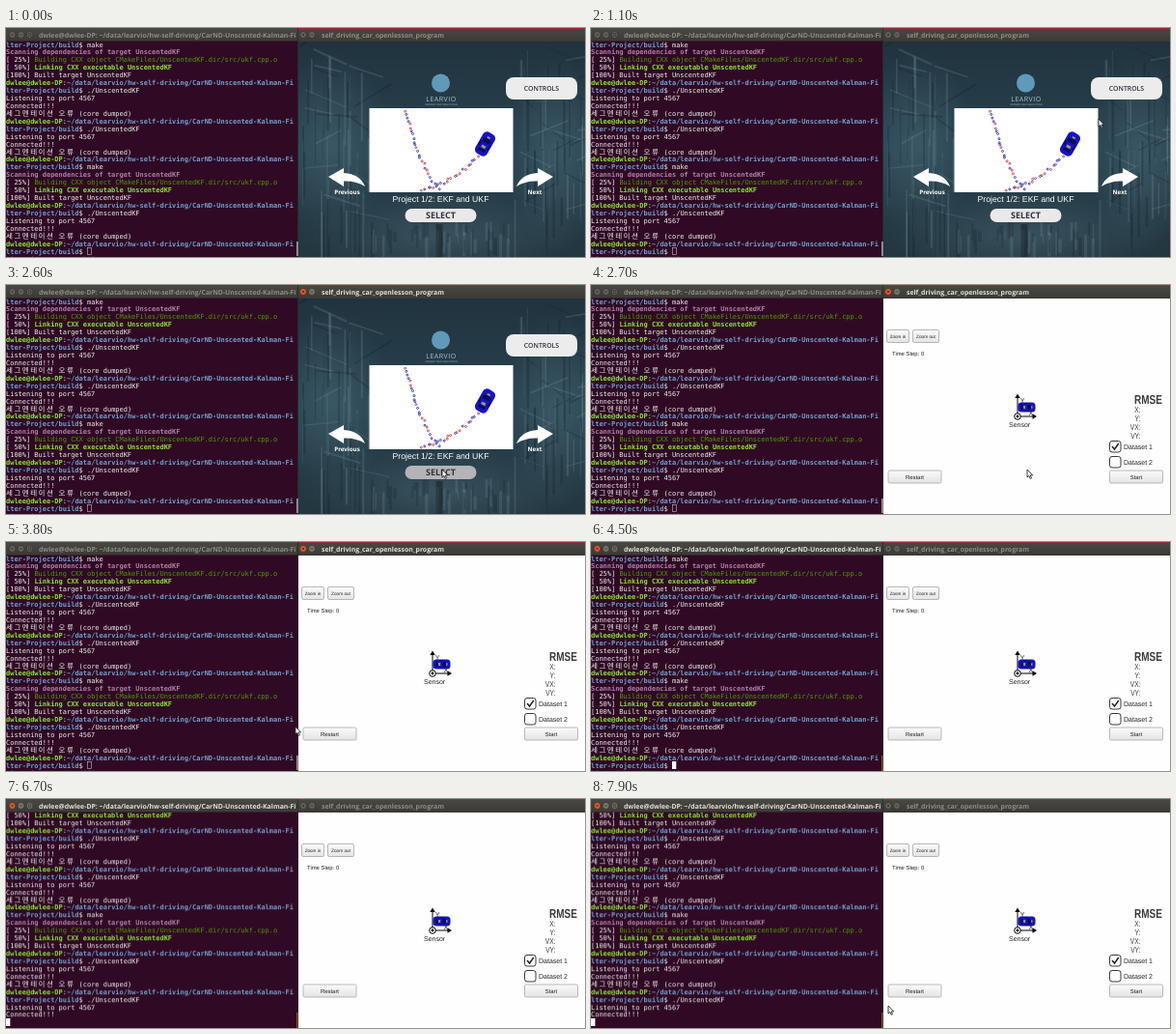
These frames come from a looping animation (600 by 237 pixels, 8000 ms). An HTML page:

```html
<!DOCTYPE html>
<html lang="en">
<head>
<meta charset="utf-8">
<title>Terminal and simulator</title>
<style>
html, body { margin: 0; width: 100%; height: 100%; overflow: hidden; background: #2b2a27; }
svg { display: block; width: 100%; height: 100%; }
text { white-space: pre; text-rendering: geometricPrecision; }
.term { font: 6.977px "DejaVu Sans Mono", monospace; fill: #eeeeec; }
.user { fill: #8ae234; font-weight: bold; }
.path { fill: #729fcf; font-weight: bold; }
.scan { fill: #ad7fa8; font-weight: bold; }
.build { fill: #4e9a06; }
.link { fill: #8ae234; font-weight: bold; }
.ko { font: 7.5px "Noto Sans CJK KR", "Noto Sans CJK", sans-serif; letter-spacing: 1.5px; }
.title { font: 700 6.9px "Open Sans", sans-serif; }
.menu { font-family: "Open Sans", sans-serif; text-anchor: middle; }
.sim { font-family: "Liberation Sans", Arial, sans-serif; fill: #222; }
.mid { text-anchor: middle; }
.end { text-anchor: end; }

/* one shared 8 s clock */
.hold { animation: 8s step-end infinite; }
.left-on { animation-name: leftOn; }
.left-off { animation-name: leftOff; }
.right-on { animation-name: rightOn; }
.right-off { animation-name: rightOff; }
.simscene { animation-name: simScene; }
.select { animation-name: press; }
.scroll { animation-name: scroll; }
.caret { animation-name: type; }
.block { animation-name: blink; }
.pointer { animation: move 8s linear infinite; }
.show { animation-name: show; }

@keyframes leftOn { 0% { opacity: 0 } 51.25%, 100% { opacity: 1 } }
@keyframes leftOff { 0% { opacity: 1 } 51.25%, 100% { opacity: 0 } }
@keyframes rightOn { 0% { opacity: 0 } 30% { opacity: 1 } 51.25%, 100% { opacity: 0 } }
@keyframes rightOff { 0% { opacity: 1 } 30% { opacity: 0 } 51.25%, 100% { opacity: 1 } }
@keyframes simScene { 0% { opacity: 0 } 33.75%, 100% { opacity: 1 } }
@keyframes press { 0% { fill: #e9e9ea } 31.25% { fill: #b4b4b6 } 33.75%, 100% { fill: #e9e9ea } }
@keyframes scroll { 0% { transform: none } 83.75%, 100% { transform: translateY(-23.79px) } }
@keyframes type {
  0% { transform: translate(84px, 0) }
  60% { transform: translate(88.2px, 0) }
  61.25% { transform: translate(92.4px, 0) }
  65% { transform: translate(96.6px, 0) }
  66.25% { transform: translate(100.8px, 0) }
  67.5% { transform: translate(105px, 0) }
  70% { transform: translate(109.2px, 0) }
  71.25% { transform: translate(113.4px, 0) }
  72.5% { transform: translate(142.8px, 0) }
  83.75%, 100% { transform: translate(0, 23.79px) }
}
@keyframes blink {
  0% { opacity: 0 } 51.25% { opacity: 1 } 80% { opacity: 0 }
  83.75% { opacity: 1 } 91.25% { opacity: 0 } 98.75%, 100% { opacity: 1 }
}
@keyframes show { 0% { opacity: 0 } 5% { opacity: 1 } 55% { opacity: 0 } 98.75%, 100% { opacity: 1 } }
@keyframes move {
  0%, 5% { transform: translate(597px, 62px) }
  11.25%, 13.75% { transform: translate(526px, 94px) }
  23.75% { transform: translate(457px, 188px) }
  26.25%, 38.75% { transform: translate(452px, 191px) }
  47.5% { transform: translate(300px, 191px) }
  48.75% { transform: translate(287px, 192px) }
  53.75%, 98.7% { transform: translate(265px, 195px) }
  98.75%, 100% { transform: translate(308px, 214px) }
}
</style>
</head>
<body>
<svg viewBox="0 0 600 237" preserveAspectRatio="none">
  <defs>
    <linearGradient id="night" x1="0" y1="0" x2="0" y2="1">
      <stop offset="0" stop-color="#20333e"/>
      <stop offset=".5" stop-color="#284350"/>
      <stop offset="1" stop-color="#22363f"/>
    </linearGradient>
    <radialGradient id="glow">
      <stop offset="0" stop-color="#4d6b79" stop-opacity=".5"/>
      <stop offset="1" stop-color="#4d6b79" stop-opacity="0"/>
    </radialGradient>
    <linearGradient id="btn" x1="0" y1="0" x2="0" y2="1">
      <stop offset="0" stop-color="#fafafa"/>
      <stop offset="1" stop-color="#e4e4e4"/>
    </linearGradient>
    <linearGradient id="bar" x1="0" y1="0" x2="0" y2="1">
      <stop offset="0" stop-color="#4a4843"/>
      <stop offset="1" stop-color="#3b3a36"/>
    </linearGradient>
    <clipPath id="termBox"><rect y="13" width="303" height="224"/></clipPath>
    <clipPath id="titleBox"><rect width="300" height="14"/></clipPath>
    <clipPath id="sceneBox"><rect x="303" y="14" width="297" height="223"/></clipPath>
    <g id="car">
      <rect x="-9" y="-5" width="18" height="10" rx="3.500" fill="#1414c6"/>
      <path d="M3-3.6Q6 0 3 3.6L1 2.6V-2.6Z M-6-3L-4-2.4V2.4L-6 3Z" fill="#0b0b52"/>
      <path d="M-3-3.7H1M-3 3.7H1" stroke="#0b0b52"/>
      <path d="M-3.4-1.6H-1.4V1.6H-3.4Z M4.6-1.2H6V1.2H4.6Z" fill="#a79b52"/>
    </g>
    <path id="next" d="M567 154L551 145V150Q534 151 529 164Q538 158 551 158.500V164Z" fill="#fff"/>
  </defs>

  <!-- terminal -->
  <rect width="302" height="237" fill="#300a24"/>
  <g clip-path="url(#termBox)">
    <g class="scroll hold">
      <g id="rows" class="term"></g>
      <g class="caret hold">
        <rect y="226.500" width="75" height="8.500" fill="#300a24"/>
        <rect class="left-off hold" x=".5" y="227.500" width="4" height="7" fill="none" stroke="#c4bcc2" stroke-width=".6"/>
        <rect class="block hold" y="227" width="4.300" height="8" fill="#fff"/>
      </g>
    </g>
  </g>
  <rect width="302" height="13.500" fill="url(#bar)"/>
  <g id="leftBar" clip-path="url(#titleBox)"></g>

  <!-- simulator menu -->
  <g clip-path="url(#sceneBox)">
    <rect x="303" y="14" width="297" height="223" fill="url(#night)"/>
    <ellipse cx="338" cy="120" rx="60" ry="95" fill="url(#glow)"/>
    <ellipse cx="570" cy="130" rx="55" ry="100" fill="url(#glow)"/>
    <ellipse cx="450" cy="215" rx="140" ry="45" fill="url(#glow)"/>
    <g id="city" fill="none"></g>
  </g>
  <circle cx="450.500" cy="57" r="9.500" fill="#5f9ab8"/>
  <g class="menu" fill="#a9c6d4">
    <text x="451" y="75.500" font-size="7" letter-spacing=".5">LEARVIO</text>
    <text x="451" y="80" font-size="2.400">ADVANCE YOUR SKILLS TODAY</text>
  </g>
  <rect x="518" y="51" width="74" height="23" rx="8" fill="#ececed"/>
  <text class="menu" x="555" y="65" font-size="6.900" font-weight="600" fill="#2b2f35">CONTROLS</text>
  <rect x="376.500" y="83" width="149" height="87" fill="#fff"/>
  <g id="dots" fill="none" stroke-width=".9"></g>
  <use href="#car" transform="translate(496.500 120) rotate(-60) scale(1.4)"/>
  <use href="#next"/>
  <use href="#next" transform="translate(901 0) scale(-1 1)"/>
  <g class="menu" fill="#fff" font-size="6.200" font-weight="700">
    <text x="353.500" y="171.500">Previous</text>
    <text x="548" y="171.500">Next</text>
  </g>
  <text class="sim mid" x="450.500" y="180.300" font-size="8.700" style="fill:#fff">Project 1/2: EKF and UKF</text>
  <rect class="select hold" x="413.500" y="187" width="74" height="14" rx="7"/>
  <text class="menu" x="450.500" y="197.300" font-size="9" font-weight="700" fill="#30343a">SELECT</text>

  <!-- simulator run -->
  <g class="simscene hold sim">
    <rect x="303" y="14" width="297" height="223" fill="#fefefe"/>
    <g id="buttons"></g>
    <text x="312" y="73" font-size="5.900">Time Step: 0</text>
    <use href="#car" transform="translate(451.500 126.500)"/>
    <g stroke="#000" fill="none">
      <path d="M442 133V115M445 136H459"/>
      <circle cx="442" cy="136" r="3.300" fill="#fff"/>
    </g>
    <path d="M442 112.500L439.300 117H444.700Z M462 136L457.500 133.300V138.700Z" fill="#000"/>
    <circle cx="442" cy="136" r="1.400" fill="#000"/>
    <text x="444.800" y="121.500" font-size="7">Y</text>
    <text x="453.500" y="134.800" font-size="7">X</text>
    <text x="433" y="146.700" font-size="7">Sensor</text>
    <g style="fill:#3a3a3a">
      <text transform="translate(563 122.800) scale(.77 1)" font-size="13" font-weight="bold">RMSE</text>
      <g id="errors" font-size="8.600" class="end"></g>
    </g>
    <g fill="#fff" stroke="#222" stroke-width=".9">
      <rect x="537.500" y="161.500" width="11.500" height="11.500" rx="2.500"/>
      <rect x="537.500" y="177.500" width="11.500" height="11.500" rx="2.500"/>
      <path d="M540 167L542.500 170L546.800 164" fill="none" stroke-width="1.500"/>
    </g>
    <text x="552" y="170" font-size="7">Dataset 1</text>
    <text x="552" y="185.700" font-size="7">Dataset 2</text>
  </g>

  <!-- simulator frame -->
  <rect x="302" width="298" height="14" fill="url(#bar)"/>
  <rect x="302" width="298" height="1" fill="#9c2a2c"/>
  <rect x="302" width=".8" height="237" fill="#2b2a27"/>
  <g id="rightBar"></g>
  <rect class="left-off hold" x="301.300" y="221" width="1.200" height="15" fill="#d5cdd0"/>
  <rect class="left-on hold" x="301" y="221" width="1.500" height="16" fill="#8a4a2c"/>

  <g class="pointer"><path class="show hold" d="M0 0V8L1.900 6.400L3.200 9.400L4.500 8.800L3.200 5.900H5.700Z" fill="#fff" stroke="#111" stroke-width=".8"/></g>
</svg>
<script>
const NS = 'http://www.w3.org/2000/svg';
const CELL = 4.2, STEP = 7.93;

function add(parent, tag, attrs, text) {
  const el = document.createElementNS(NS, tag);
  for (const k in attrs) el.setAttribute(k, attrs[k]);
  if (text) el.textContent = text;
  (parent.nodeType ? parent : document.getElementById(parent)).appendChild(el);
  return el;
}

// terminal rows: lists of [class, text] runs
const plain = s => [['', s]];
const prompt = cmd => [
  [['user', 'dwlee@dwlee-DP'], ['', ':'], ['path', '~/data/learvio/hw-self-driving/CarND-Unscented-Kalman-Fi']],
  [['path', 'lter-Project/build'], ['', '$ ' + cmd]]
];
const make = [
  [['scan', 'Scanning dependencies of target UnscentedKF']],
  [['', '[ 25%] '], ['build', 'Building CXX object CMakeFiles/UnscentedKF.dir/src/ukf.cpp.o']],
  [['', '[ 50%] '], ['link', 'Linking CXX executable UnscentedKF']],
  plain('[100%] Built target UnscentedKF')
];
const started = [plain('Listening to port 4567'), plain('Connected!!!')];
const run = [...prompt('./UnscentedKF'), ...started, [['ko', '세그멘테이션 오류'], ['', ' (core dumped)']]];
const rows = [
  prompt('make')[1], ...make, ...run, ...run,
  ...prompt('make'), ...make, ...run, ...prompt('./UnscentedKF'), ...started
];
rows.forEach((runs, i) => {
  let col = 0;
  for (const [cls, s] of runs) {
    const y = 19.5 + i * STEP;
    if (cls === 'ko') {
      s.split(' ').forEach(word => {
        add('rows', 'text', { class: cls, x: col * CELL, y }, word);
        col += word.length * 2 + 1;
      });
      col--;
    } else {
      add('rows', 'text', { class: cls, x: col * CELL, y }, s);
      col += s.length;
    }
  }
});

// title bars, focused and unfocused
function titleBar(id, side, x, count, label, labelX) {
  for (const on of [false, true]) {
    const g = add(id, 'g', { class: `${side}-${on ? 'on' : 'off'} hold` });
    for (let i = 0; i < count; i++) {
      const fill = !on ? '#66635d' : i ? '#7b786f' : '#e8582c';
      const cx = x + i * 9;
      add(g, 'circle', { cx, cy: 7, r: 3.4, fill, stroke: '#2c2b28', 'stroke-width': .6 });
      const mark = i === 0 ? `M${cx - 1.2} 5.800l2.400 2.400m0-2.400l-2.400 2.400`
        : i === 1 ? `M${cx - 1.5} 7h3` : `M${cx - 1.3} 5.700h2.600v2.600h-2.600z`;
      add(g, 'path', { d: mark, fill: 'none', stroke: '#34322e', 'stroke-width': .8 });
    }
    add(g, 'text', { class: 'title', x: labelX, y: 9.7, fill: on ? '#e4e0d8' : '#8f8c85' }, label);
  }
}
titleBar('leftBar', 'left', 6.5, 3, 'dwlee@dwlee-DP: ~/data/learvio/hw-self-driving/CarND-Unscented-Kalman-Filter-Project/build', 34);
titleBar('rightBar', 'right', 308, 2, 'self_driving_car_openlesson_program', 327);

// simulator controls
function button(x, y, w, label, size) {
  add('buttons', 'rect', { x, y, width: w, height: 13, rx: 1.5, fill: 'url(#btn)', stroke: '#a8a8a8', 'stroke-width': .8 });
  add('buttons', 'text', { class: 'mid', x: x + w / 2, y: y + 8.5, 'font-size': size }, label);
}
button(306.5, 46.5, 23, 'Zoom in', 4.6);
button(333.5, 46.5, 27, 'Zoom out', 4.7);
button(308, 192, 55, 'Restart', 5.9);
button(537.5, 192, 55, 'Start', 5.9);
['X:', 'Y:', 'VX:', 'VY:'].forEach((s, i) =>
  add('errors', 'text', { transform: `translate(569.500 ${131.5 + i * 9}) scale(.77 1)` }, s));

// measurement trails
let seed = 7;
const rnd = () => (seed = seed * 16807 % 2147483647) / 2147483647;
function trail(a, c, b, n) {
  for (let i = 0; i < n; i++) {
    const u = i / (n - 1), v = 1 - u;
    const at = k => v * v * a[k] + 2 * u * v * c[k] + u * u * b[k] + (rnd() - .5) * 2.8;
    add('dots', 'circle', { cx: at(0), cy: at(1), r: 1, stroke: rnd() < .45 ? '#c23a44' : '#2a2ab4' });
  }
}
trail([415, 85], [422, 130], [448, 167], 25);
trail([431, 168], [464, 160], [489, 133], 21);

// faint scaffolding of the skyline
for (let i = 0; i < 110; i++) {
  const x = 304 + (i % 2 ? rnd() * 75 : 222 + rnd() * 72), y = 18 + rnd() * 175;
  const d = i % 3 ? `M${x} ${y}v${20 + rnd() * 60}` : `M${x} ${y}l${20 + rnd() * 25} ${rnd() * 50 - 25}`;
  add('city', 'path', { d, stroke: rnd() < .5 ? '#0d1820' : '#7a939f', 'stroke-opacity': .24, 'stroke-width': .6 + rnd() * 1.8 });
}
for (let i = 0; i < 40; i++) {
  const d = `M${375 + rnd() * 150} ${200 + rnd() * 20}v${8 + rnd() * 25}`;
  add('city', 'path', { d, stroke: rnd() < .5 ? '#0d1820' : '#7a939f', 'stroke-opacity': .22, 'stroke-width': 1 + rnd() * 3 });
}
add('city', 'path', { d: 'M449 203V237', stroke: '#111d24', 'stroke-opacity': .5, 'stroke-width': 7 });
</script>
</body>
</html>
```
